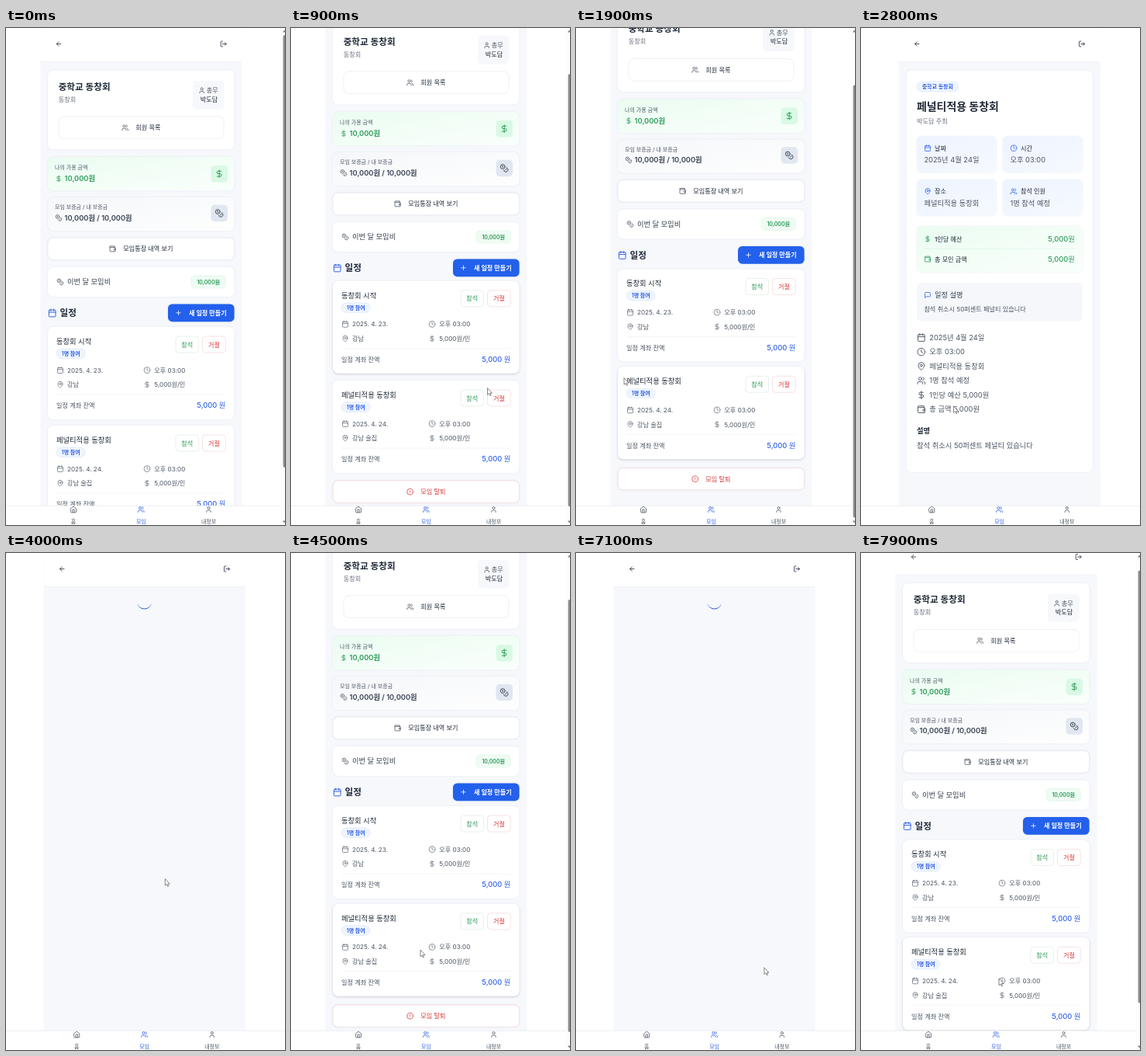
An HTML page for the animation above (8000 ms loop, 360 px wide and 640 px high).

```html
<!DOCTYPE html>
<html lang="ko">
<head>
<meta charset="utf-8">
<style>
  html, body { margin: 0; width: 100%; height: 100%; overflow: hidden; background: #fff; }
  svg { display: block; width: 360px; height: 640px; }
  text { font-family: Inter, 'Noto Sans CJK KR', 'Noto Sans CJK JP', 'Noto Sans', sans-serif; white-space: pre; }
  .icon { fill: none; stroke-width: 2; stroke-linecap: round; stroke-linejoin: round; }
  .card { filter: drop-shadow(0 .5px .8px #0f172a14); }
  .hover .card { filter: drop-shadow(0 1.6px 1.8px #0f172a30); }
</style>
</head>
<body>
<svg id="stage" viewBox="0 0 360 640"></svg>
<script>
const INK = '#1f2937', TEXT = '#4b5563', GRAY = '#6b7280', BLUE = '#2f5fe8', GREEN = '#2b9a58', RED = '#d93636';
const XS = 6.97, SM = 8.13, MD = 9.29, LG = 11.6, XL = 13.93;
const SHIFT = 4.3; // the page is centred further right without a scrollbar
const HOST = '박도담';

const ring = (x, y, r) => `M${x + r} ${y}a${r} ${r} 0 1 1-${2 * r} 0a${r} ${r} 0 1 1 ${2 * r} 0`;
const ICONS = {
  back: 'M12 19l-7-7 7-7M19 12H5',
  exit: 'M9 21H5a2 2 0 0 1-2-2V5a2 2 0 0 1 2-2h4M16 17l5-5-5-5M21 12H9',
  users: 'M16 21v-2a4 4 0 0 0-4-4H6a4 4 0 0 0-4 4v2M22 21v-2a4 4 0 0 0-3-3.87M16 3.13a4 4 0 0 1 0 7.75' + ring(9, 7, 4),
  user: 'M19 21v-2a4 4 0 0 0-4-4H9a4 4 0 0 0-4 4v2' + ring(12, 7, 4),
  dollar: 'M12 2v20M17 5H9.5a3.5 3.5 0 0 0 0 7h5a3.5 3.5 0 0 1 0 7H6',
  coins: 'M18.09 10.37A6 6 0 1 1 10.34 18M7 6h1v4M16.71 13.88l.7.71-2.82 2.82' + ring(8, 8, 6),
  wallet: 'M21 12V7H5a2 2 0 0 1 0-4h14v4M3 5v14a2 2 0 0 0 2 2h16v-5M18 12a2 2 0 0 0 0 4h4v-4Z',
  calendar: 'M8 2v4M16 2v4M3 10h18M5 4h14a2 2 0 0 1 2 2v14a2 2 0 0 1-2 2H5a2 2 0 0 1-2-2V6a2 2 0 0 1 2-2Z',
  clock: 'M12 6v6l4 2' + ring(12, 12, 10),
  pin: 'M20 10c0 6-8 12-8 12s-8-6-8-12a8 8 0 0 1 16 0Z' + ring(12, 10, 3),
  plus: 'M5 12h14M12 5v14',
  home: 'M3 9l9-7 9 7v11a2 2 0 0 1-2 2H5a2 2 0 0 1-2-2zM9 22V12h6v10',
  message: 'M21 15a2 2 0 0 1-2 2H7l-4 4V5a2 2 0 0 1 2-2h14a2 2 0 0 1 2 2z',
  alert: 'M12 8v4M12 16h.01' + ring(12, 12, 10)
};

// Text and icons are placed by their vertical centre.
const text = (x, y, size, str, fill = TEXT, weight = 400, anchor = 'start') =>
  `<text x="${x}" y="${y + size * .37}" font-size="${size}" fill="${fill}" font-weight="${weight}" text-anchor="${anchor}">${str}</text>`;
const icon = (name, x, y, color = TEXT, size = MD) =>
  `<path class="icon" d="${ICONS[name]}" stroke="${color}" transform="translate(${x - size / 2} ${y - size / 2}) scale(${size / 24})"/>`;
const box = (x1, y1, x2, y2, r, fill, stroke = 'none', cls = '') =>
  `<rect class="${cls}" x="${x1}" y="${y1}" width="${x2 - x1}" height="${y2 - y1}" rx="${r}" fill="${fill}" stroke="${stroke}" stroke-width=".6"/>`;
const card = (y1, y2, fill = '#fff', stroke = 'none') => box(54, y1, 294.6, y2, 7, fill, stroke, 'card');
const rule = (x1, x2, y, color) => `<path d="M${x1} ${y}H${x2}" stroke="${color}" stroke-width=".6"/>`;
const group = (id, body) => `<g id="${id}">${body}</g>`;
const gradient = (id, from, to) =>
  `<linearGradient id="${id}" x2="1" y2="1"><stop stop-color="${from}"/><stop offset="1" stop-color="${to}"/></linearGradient>`;

const page = () =>
  box(44.4, 0, 304.4, 800, 0, '#f6f8fc') + box(44.4, 0, 304.4, 43.5, 0, '#fff') + rule(44.4, 304.4, 43.6, '#e8ebf0') +
  icon('back', 68, 20.5, INK) + icon('exit', 280.7, 20.5, INK);

const CARD_TOPS = [385, 512], CARD_HEIGHT = 119;
const eventCard = (i, title, date, place) => {
  const y = CARD_TOPS[i];
  return group('event' + i,
    card(y, y + CARD_HEIGHT) +
    text(65, y + 18.3, MD, title, INK, 500) +
    box(65.3, y + 28, 102, y + 40.5, 6.2, '#eff5ff', '#d3e2fd') + text(71.7, y + 34.4, XS, '1명 참여', BLUE, 600) +
    box(219, y + 12, 248.5, y + 33, 4, '#fff', '#d5e9dc') + text(233.7, y + 22.6, SM, '참석', GREEN, 500, 'middle') +
    box(253.5, y + 12, 283.3, y + 33, 4, '#fff', '#f5cfcf') + text(268.4, y + 22.6, SM, '거절', RED, 500, 'middle') +
    icon('calendar', 70, y + 55.6, GRAY) + text(79, y + 55.6, SM, date) +
    icon('clock', 182, y + 55.6, GRAY) + text(191.3, y + 55.6, SM, '오후 03:00') +
    icon('pin', 70, y + 74.2, GRAY) + text(79, y + 74.2, SM, place) +
    icon('dollar', 182, y + 74.2, GRAY) + text(191.3, y + 74.2, SM, '5,000원/인') +
    rule(65.4, 283.2, y + 87, '#eceff3') +
    text(65, y + 101.3, SM, '일정 계좌 잔액') + text(283.2, y + 101, MD, '5,000 원', BLUE, 500, 'end'));
};

const list = page() +
  card(54.5, 156.5) +
  text(67.7, 75.5, LG, '중학교 동창회', INK, 600) + text(67.7, 91.8, SM, '동창회', GRAY) +
  box(241, 68, 281.6, 104.5, 5, '#f6f8fb') +
  icon('user', 252.7, 80.3) + text(258.8, 80.3, SM, '총무') + text(262, 91.8, SM, HOST, INK, 500, 'middle') +
  box(68, 114, 281, 142.6, 6.5, '#fff', '#e2e6ec') + icon('users', 153.6, 128.3) + text(167.3, 128.3, SM, '회원 목록', INK, 500) +
  card(166, 209.5, 'url(#mint)') +
  text(63, 179.5, XS, '나의 가용 금액') + icon('dollar', 68, 194, GREEN) + text(75.6, 193.6, MD, '10,000원', GREEN, 600) +
  box(264.5, 177, 286, 198.5, 4.6, '#d9f9e4') + icon('dollar', 275.2, 187.7, GREEN, LG) +
  card(218, 261, 'url(#slate)') +
  text(63, 230.5, XS, '모임 보증금 / 내 보증금') + icon('coins', 68, 244.5) + text(75.6, 244.3, MD, '10,000원 / 10,000원', '#374151', 600) +
  box(264.5, 227.7, 286, 249.2, 4.6, '#e1e7f0') + icon('coins', 275.2, 238.5, '#374151', LG) +
  card(270.2, 298.6, '#fff', '#e2e6ec') + icon('wallet', 137.5, 284.4) + text(151.3, 284.4, SM, '모임통장 내역 보기', INK, 500) +
  card(308, 346) + icon('coins', 70, 327) + text(79, 326.7, MD, '이번 달 모임비', '#374151', 500) +
  box(239, 319, 283.4, 334.8, 4.6, '#effcf3', '#d8f5e2') + text(261.2, 327, XS, '10,000원', GREEN, 600, 'middle') +
  icon('calendar', 59.7, 367, BLUE, LG) + text(69.5, 367, LG, '일정', INK, 600) +
  box(209, 355.4, 294.6, 378.2, 5.5, '#2360eb', 'none', 'card') + icon('plus', 222.5, 366.8, '#fff') + text(236, 366.8, SM, '새 일정 만들기', '#fff', 700) +
  eventCard(0, '동창회 시작', '2025. 4. 23.', '강남') +
  eventCard(1, '페널티적용 동창회', '2025. 4. 24.', '강남 술집') +
  card(641, 669.4, '#fff', '#f3cdcd') + icon('alert', 153.6, 655.2, RED) + text(167.3, 655.2, SM, '모임 탈퇴', RED, 500);

const infoBox = (x, y, name, label, value) =>
  box(x, y, x + 102.6, y + 46.6, 5.5, 'url(#sky)', 'none', 'card') +
  icon(name, x + 14, y + 15.2, BLUE) + text(x + 23, y + 15.2, SM, label, INK, 500) + text(x + 9.4, y + 30.5, MD, value);

const summary = [
  ['calendar', '2025년 4월 24일'], ['clock', '오후 03:00'], ['pin', '페널티적용 동창회'],
  ['users', '1명 참석 예정'], ['dollar', '1인당 예산 5,000원'], ['wallet', '총 금액 5,000원']
].map(([name, label], i) => icon(name, 77.8, 398.6 + i * 18.5, TEXT, LG) + text(88.3, 398.5 + i * 18.5, MD, label)).join('');

const NOTICE = '참석 취소시 50퍼센트 페널티 있습니다';
const detail =
  box(58.5, 54.5, 298.7, 572, 7, '#fff', 'none', 'card') +
  box(72.2, 69, 125.4, 82, 6.5, '#eff5ff', '#d3e2fd') + text(98.8, 75.5, XS, '중학교 동창회', BLUE, 600, 'middle') +
  text(72, 100.5, XL, '페널티적용 동창회', INK, 700) + text(72, 120, SM, HOST + ' 주최', GRAY) +
  infoBox(72, 139.5, 'calendar', '날짜', '2025년 4월 24일') + infoBox(183, 139.5, 'clock', '시간', '오후 03:00') +
  infoBox(72, 195.2, 'pin', '장소', '페널티적용 동창회') + infoBox(183, 195.2, 'users', '참석 인원', '1명 참석 예정') +
  box(72, 255.5, 285.6, 314.5, 5.5, 'url(#mint)', 'none', 'card') + rule(81.3, 276, 284.5, '#d8f5e2') +
  icon('dollar', 86, 271.7, GREEN) + text(95, 271.7, SM, '1인당 예산', INK, 500) + text(275.8, 271.7, MD, '5,000원', GREEN, 500, 'end') +
  icon('wallet', 86, 297.6, GREEN) + text(95, 297.6, SM, '총 모인 금액', INK, 500) + text(275.8, 297.6, MD, '5,000원', GREEN, 500, 'end') +
  box(72, 328, 285.6, 377.5, 5.5, '#f5f7fb') + icon('message', 86, 344, BLUE) + text(95, 344, MD, '일정 설명', '#374151', 500) +
  text(81.4, 362, SM, NOTICE) +
  summary + text(72, 519, MD, '설명', INK, 700) + text(72, 537.5, MD, NOTICE);

const tab = (x, name, label, color) => icon(name, x, 620, color) + text(x, 635.8, XS, label, color, 400, 'middle');
const nav = box(-10, 615, 370, 645, 0, '#fff') + rule(-10, 370, 615.2, '#dfe3e8') +
  tab(87, 'home', '홈', TEXT) + tab(174.3, 'users', '모임', BLUE) + tab(261.5, 'user', '내정보', TEXT);

const bar = box(354.5, 0, 361, 640, 0, '#fcfcfc') +
  '<path d="M356.8 5.5l2.4-3 2.4 3ZM356.8 634.5l2.4 3 2.4-3Z" fill="#8b8b8b"/>' +
  '<rect id="thumb" x="357.6" width="4" height="557" rx="2" fill="#8b8b8b"/>';

const stage = document.getElementById('stage');
stage.innerHTML =
  '<defs>' + gradient('mint', '#ebfcf1', '#fafffc') + gradient('slate', '#f5f7fa', '#fefefe') + gradient('sky', '#edf4ff', '#f6f9ff') + '</defs>' +
  group('list', list) + group('plain', page()) + group('detail', detail) +
  group('spinner', '<path d="M-9.3 0A9.3 9.3 0 0 0 9.3 0A9.3 8.1 0 0 1-9.3 0Z" fill="#3f63dd"/>') +
  group('nav', nav) + group('bar', bar) +
  group('cursor', '<path d="M0 0V8.7L2 7 3.3 9.9 4.6 9.3 3.4 6.5H6Z" fill="#fff" stroke="#555" stroke-width=".7"/>');
const el = id => document.getElementById(id);

// Timeline: [time, ...values], linear between entries.
const VIEWS = [[0, 'list'], [2600, 'spinner'], [2800, 'detail'], [4000, 'spinner'], [4300, 'list'],
  [5300, 'spinner'], [5500, 'detail'], [7100, 'spinner'], [7300, 'list']];
const SCROLL = [[0, 0], [300, 0], [500, 58], [1200, 58], [1400, 74.5], [4200, 74.5], [4300, 0], [4500, 59], [4600, 74.5],
  [7200, 74.5], [7300, 0], [7800, 0], [7900, 15.5]];
const CURSOR = [[0, 364, 300], [300, 290, 350], [900, 253.5, 463.5], [1900, 62, 450.5], [2600, 100, 500], [2700, 100, 500],
  [3300, 217, 421], [3400, 217, 421], [3800, 205.3, 419.5], [4000, 205.3, 419.5], [4500, 167, 511], [5300, 164, 500],
  [5700, 156.8, 480], [6000, 66, 530], [6300, 230, 542], [6600, 93, 538], [6800, 251, 532], [7000, 251, 532], [7900, 178, 548]];

function at(track, t) {
  const i = track.findIndex(k => k[0] > t);
  if (i < 0) return track[track.length - 1].slice(1);
  const a = track[i - 1], b = track[i], f = (t - a[0]) / (b[0] - a[0]);
  return a.slice(1).map((v, j) => v + (b[j + 1] - v) * f);
}

function hovered(t) {
  const [x, y] = at(CURSOR, t), [s] = at(SCROLL, t);
  return CARD_TOPS.findIndex(top => x > 54 && x < 294.6 && y + s > top && y + s < top + CARD_HEIGHT);
}

function draw(t) {
  const [start, view] = VIEWS.filter(v => v[0] <= t).pop();
  const [scroll] = at(SCROLL, t), [x, y] = at(CURSOR, t);
  const onList = view === 'list', hover = hovered(Math.max(0, t - 100));
  const show = (id, on) => el(id).setAttribute('display', on ? 'inline' : 'none');
  const move = (id, dx, dy, more = '') => el(id).setAttribute('transform', `translate(${dx} ${dy})${more}`);
  show('list', onList);
  show('bar', onList);
  show('plain', !onList);
  show('detail', view === 'detail');
  show('spinner', view === 'spinner');
  move('list', 0, -scroll);
  move('plain', SHIFT, 0);
  move('nav', onList ? 0 : SHIFT, 0);
  move('spinner', 178.6, 63.3, ` rotate(${(t - start) * .36})`);
  move('thumb', 0, 9 + scroll * .866);
  move('cursor', x, y);
  CARD_TOPS.forEach((_, i) => {
    move('event' + i, 0, i === hover ? -1.2 : 0);
    el('event' + i).classList.toggle('hover', i === hover);
  });
}

function frame() {
  draw(Math.floor(performance.now() % 8000 / 100) * 100);
  requestAnimationFrame(frame);
}
frame();
</script>
</body>
</html>
```
